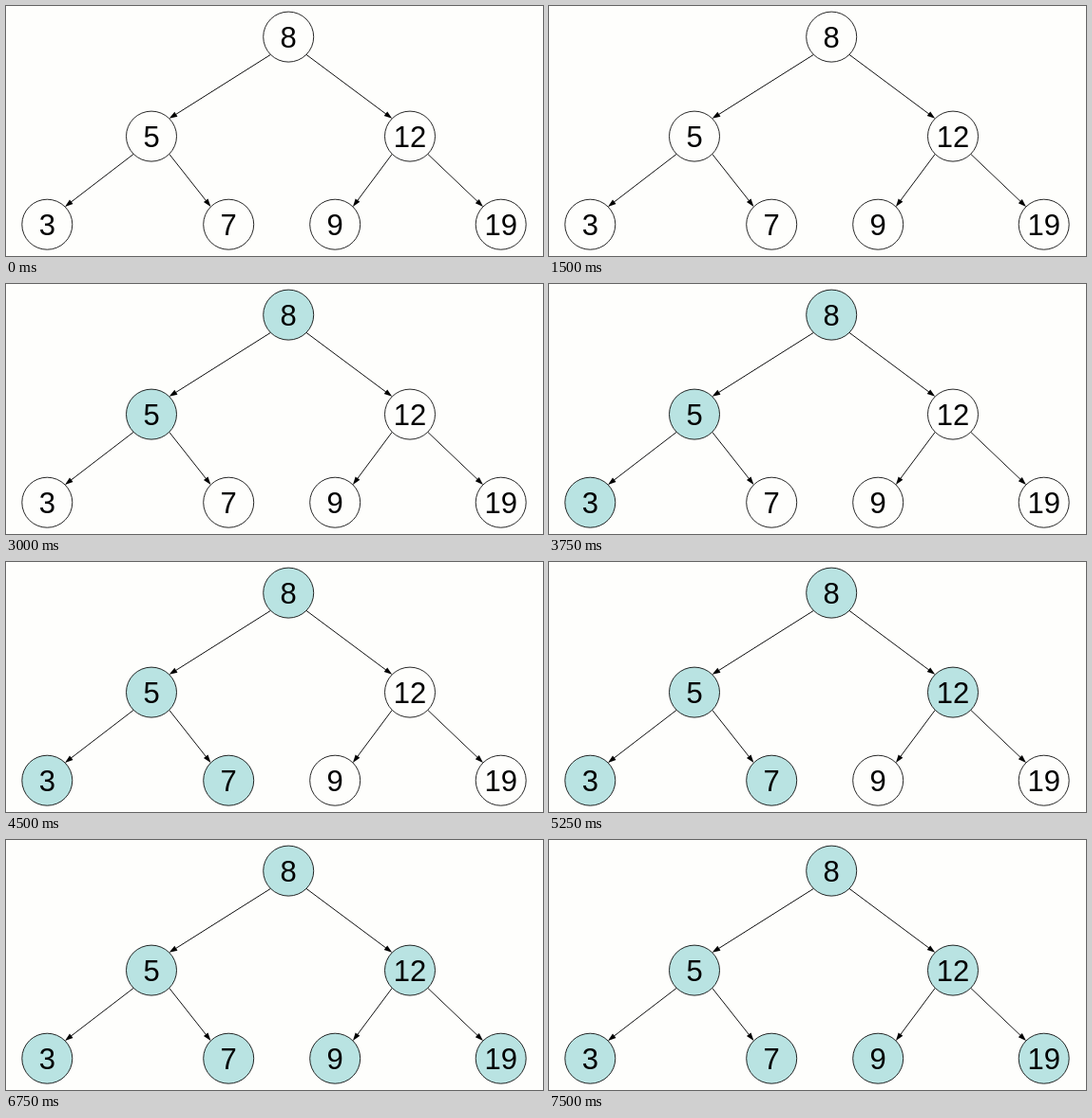
These frames come from a looping animation (565x264 px, 9 s). An HTML page with a canvas:

```html
<!DOCTYPE html>
<html lang="en">
<head>
<meta charset="utf-8">
<title>Preorder tree walk</title>
<style>
html, body { margin: 0; width: 100%; height: 100%; overflow: hidden; background: #fefefc; }
canvas { display: block; width: 565px; height: 264px; }
</style>
</head>
<body>
<canvas id="stage" width="565" height="264"></canvas>
<script>
const ctx = document.getElementById('stage').getContext('2d');
const LOOP = 9000, STEP = 750, FIRST_VISIT = 2250;
const RADIUS = 26.5, PORT = RADIUS * Math.SQRT1_2;
const PAPER = '#fefefc', VISITED = '#b9e3e2', INK = '#000';

// Nodes in preorder, which is also the order of the visits.
const nodes = [
  { label: '8', x: 297.2, y: 32.6 },
  { label: '5', x: 153, y: 137.6, parent: 0 },
  { label: '3', x: 43.3, y: 230.7, parent: 1 },
  { label: '7', x: 234.2, y: 230.7, parent: 1 },
  { label: '12', x: 425, y: 137.6, parent: 0 },
  { label: '9', x: 346.2, y: 230.7, parent: 4 },
  { label: '19', x: 520.7, y: 230.7, parent: 4 }
];

function drawArrow(from, to) {
  const side = Math.sign(to.x - from.x);
  const x1 = from.x + side * PORT, y1 = from.y + PORT;
  const x2 = to.x - side * PORT, y2 = to.y - PORT;
  const length = Math.hypot(x2 - x1, y2 - y1);
  ctx.save();
  ctx.translate(x1, y1);
  ctx.rotate(Math.atan2(y2 - y1, x2 - x1));
  ctx.beginPath();
  ctx.moveTo(0, 0);
  ctx.lineTo(length - 6, 0);
  ctx.stroke();
  ctx.beginPath();
  ctx.moveTo(length, 0);
  ctx.lineTo(length - 8.5, -2.9);
  ctx.lineTo(length - 8.5, 2.9);
  ctx.fill();
  ctx.restore();
}

function drawNode({ label, x, y }, visited) {
  ctx.beginPath();
  ctx.arc(x, y, RADIUS, 0, Math.PI * 2);
  ctx.fillStyle = visited ? VISITED : PAPER;
  ctx.fill();
  ctx.stroke();
  ctx.fillStyle = INK;
  ctx.fillText(label, x, y + 10.9);
}

function draw(time) {
  const visits = Math.floor((time - FIRST_VISIT) / STEP) + 1;
  ctx.fillStyle = PAPER;
  ctx.fillRect(0, 0, 565, 264);
  ctx.strokeStyle = ctx.fillStyle = INK;
  ctx.lineWidth = 0.85;
  ctx.font = '31px "Liberation Sans", Arial, sans-serif';
  ctx.textAlign = 'center';
  for (const node of nodes) {
    if (node.parent !== undefined) drawArrow(nodes[node.parent], node);
  }
  nodes.forEach((node, i) => drawNode(node, i < visits));
}

const start = performance.now();
function tick() {
  draw((performance.now() - start) % LOOP);
  requestAnimationFrame(tick);
}
tick();
</script>
</body>
</html>
```
